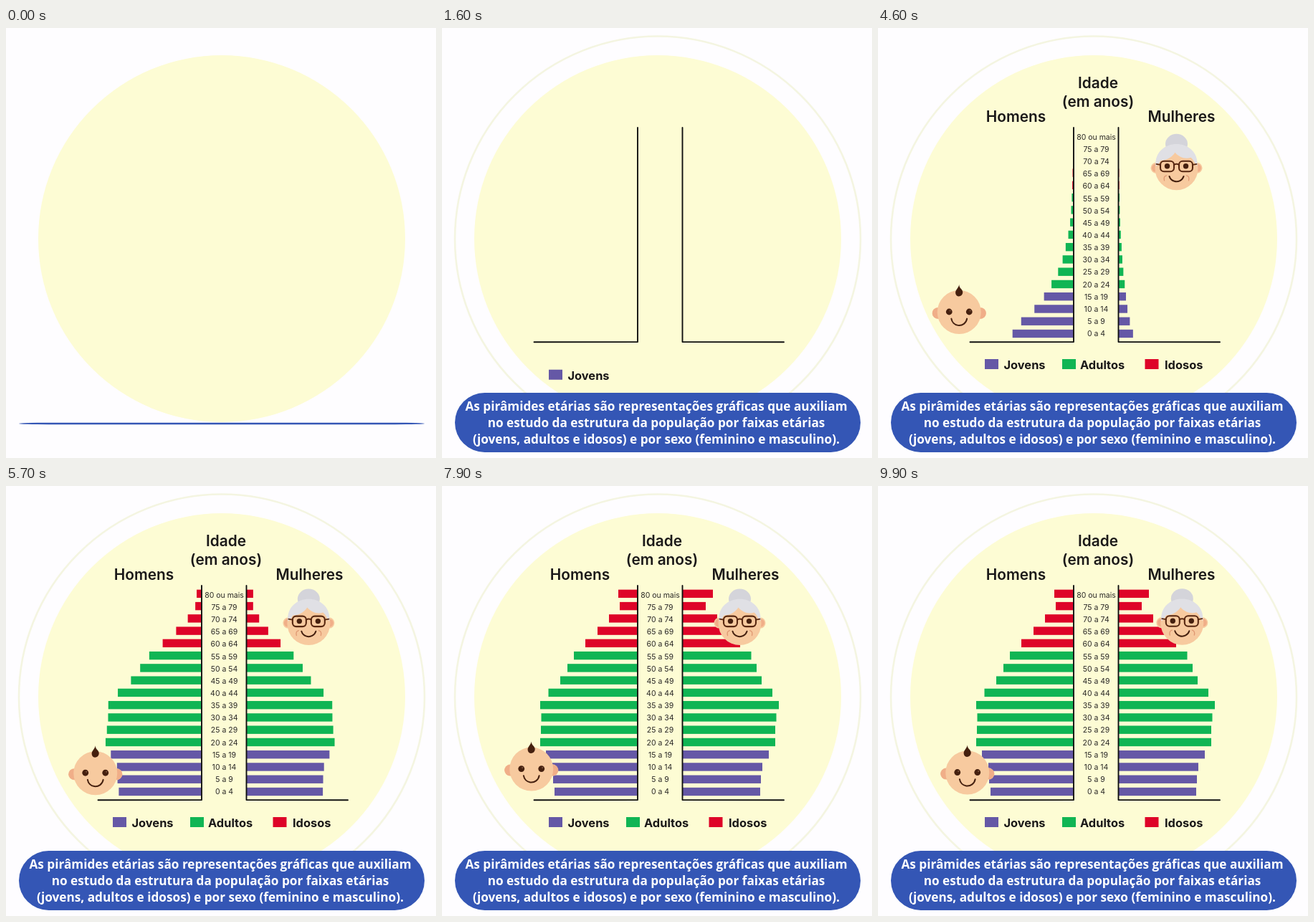
Animation of 600 by 600 pixels, one loop 10 s. Source, as an HTML page with a canvas:

```html
<!DOCTYPE html>
<html lang="pt">
<head>
<meta charset="utf-8">
<title>Pirâmide etária</title>
<style>
html, body { margin: 0; width: 100%; height: 100%; overflow: hidden; background: #fefdff; }
canvas { display: block; width: 600px; height: 600px; }
</style>
</head>
<body>
<canvas id="stage"></canvas>
<script>
const LOOP = 10000, TAU = Math.PI * 2;
const canvas = document.getElementById('stage');
const ctx = canvas.getContext('2d');
const dpr = window.devicePixelRatio || 1;
canvas.width = canvas.height = 600 * dpr;

const PURPLE = '#6558a6', GREEN = '#10b554', RED = '#de0428', INK = '#1a1818';
const BLUE = '#3456b5', BROWN = '#45200f', SKIN = '#f7ca9f', BLUSH = '#f0ae88';

// bar lengths from the youngest group up
const MEN = [115, 117, 118, 127, 135, 134, 133.5, 135, 123.5, 107, 97, 88, 72, 55, 39, 24, 26];
const WOMEN = [108, 109, 111, 120, 129, 129, 130.5, 134, 125, 110, 103, 95.5, 80, 64, 48, 32, 42];
const NOTE = [
  'As pirâmides etárias são representações gráficas que auxiliam',
  'no estudo da estrutura da população por faixas etárias',
  '(jovens, adultos e idosos) e por sexo (feminino e masculino).'
];
const LEGEND = [
  { name: 'Jovens', color: PURPLE, box: 149, x: 175.5, start: 1300 },
  { name: 'Adultos', color: GREEN, box: 257, x: 282, start: 1600 },
  { name: 'Idosos', color: RED, box: 372.5, x: 400, start: 1900 }
];

const part = (t, start, length) => Math.min(1, Math.max(0, (t - start) / length));
const outCubic = p => 1 - (1 - p) ** 3;
const inOutSine = p => (1 - Math.cos(Math.PI * p)) / 2;
const inOutExpo = p => p <= 0 ? 0 : p >= 1 ? 1
  : p < .5 ? 2 ** (20 * p - 11) : 1 - 2 ** (9 - 20 * p);
const outBack = p => 1 + 2.2 * (p - 1) ** 3 + 1.2 * (p - 1) ** 2;
const sway = (t, period, from, deg) => Math.sin(TAU * ((t - from) / period + deg / 360));

function disc(x, y, rx, color, ry = rx) {
  ctx.fillStyle = color;
  ctx.beginPath();
  ctx.ellipse(x, y, rx, ry, 0, 0, TAU);
  ctx.fill();
}

function stroke(color, width, trace) {
  ctx.strokeStyle = color;
  ctx.lineWidth = width;
  ctx.lineCap = ctx.lineJoin = 'round';
  ctx.beginPath();
  trace();
  ctx.stroke();
}

function text(str, x, y, font, color = INK, align = 'center') {
  ctx.font = font;
  ctx.fillStyle = color;
  ctx.textAlign = align;
  ctx.fillText(str, x, y);
}

function faded(alpha, draw) {
  if (alpha <= 0) return;
  ctx.save();
  ctx.globalAlpha = alpha;
  draw();
  ctx.restore();
}

function backdrop(t) {
  ctx.fillStyle = '#fefdff';
  ctx.fillRect(0, 0, 600, 600);
  disc(301, 294, 256, '#fdfcd4');
  const sweep = inOutSine(part(t, 200, 1250));
  if (sweep > 0) {
    stroke('#f4f5e1', 2.6, () => ctx.arc(301, 294.5, 283, -TAU / 4, -TAU / 4 + TAU * sweep));
  }
}

function axes(t) {
  const p = inOutSine(part(t, 700, 850));
  if (p <= 0) return;
  const up = Math.min(1, p * 1.5), out = Math.max(0, p * 3 - 2);
  for (const [x, end] of [[273, 128.5], [335.5, 477]]) {
    stroke('#111', 1.9, () => {
      ctx.moveTo(x, 139);
      ctx.lineTo(x, 139 + 299 * up);
      if (out > 0) ctx.lineTo(x + (end - x) * out, 438.2);
    });
  }
}

function legend(t) {
  for (const item of LEGEND) {
    if (t < item.start) continue;
    const drop = 50 * (1 - outCubic(part(t, item.start, 900)));
    ctx.fillStyle = item.color;
    ctx.fillRect(item.box, 462 + drop, 19, 14);
    text(item.name, item.x, 476 + drop, '700 16.4px Inter, sans-serif', INK, 'left');
  }
}

function headings(t) {
  const font = '600 20.8px Inter, sans-serif';
  const side = part(t, 1900, 800);
  faded(side, () => {
    const y = 130.5 - 20 * (1 - outCubic(side));
    text('Homens', 192.5, y, font);
    text('Mulheres', 423.5, y, font);
  });
  const top = part(t, 2350, 1200);
  faded(Math.min(1, top * 2.5), () => {
    const y = 83.5 - 31 * (1 - outCubic(top));
    text('Idade', 307, y, font);
    text('(em anos)', 307, y + 26, font);
  });
}

function ages(t) {
  for (let i = 0; i < 17; i++) {
    const label = i === 16 ? '80 ou mais' : `${i * 5} a ${i * 5 + 4}`;
    faded(part(t, 1700 + i * 55, 300), () =>
      text(label, 304.5, 430.2 - i * 17.15, '400 10.5px Inter, sans-serif', '#2a2826'));
  }
}

function bars(t) {
  const length = 3500;
  for (let i = 0; i < 17; i++) {
    const now = (t - 4600) / length;
    const y = 420.8 - i * 17.26;
    ctx.fillStyle = i < 4 ? PURPLE : i < 12 ? GREEN : RED;
    const men = MEN[i] * inOutExpo(now + .545 - i * .026);
    const women = WOMEN[i] * inOutExpo(now + .4275 - i * .019);
    if (men > .3) ctx.fillRect(272 - men, y, men, 11.4);
    if (women > .3) ctx.fillRect(336, y, women, 11.4);
  }
}

function note(t) {
  const open = Math.max(.03, outCubic(part(t, 50, 850)));
  const mid = 550.5 + 1.5 * (1 - open);
  ctx.save();
  ctx.translate(0, mid);
  ctx.scale(1, open);
  ctx.fillStyle = BLUE;
  ctx.beginPath();
  ctx.roundRect(18, -41.5, 566, 83, 41.5);
  ctx.fill();
  ctx.restore();
  faded(part(t, 550, 500), () => NOTE.forEach((line, i) =>
    text(line, 299, 533.5 + i * 23.2, '700 17.2px "Open Sans", "Noto Sans", sans-serif', '#fff')));
}

function baby() {
  for (const s of [-1, 1]) {
    disc(s * 29, 1.5, 8.3, SKIN);
    disc(s * 30, 1.5, 7.6, BLUSH);
  }
  disc(0, 0, 30.5, SKIN);
  ctx.fillStyle = BROWN;
  ctx.beginPath();
  ctx.moveTo(0, -38.5);
  ctx.bezierCurveTo(-1, -33, -6, -31, -5, -26);
  ctx.bezierCurveTo(-4, -20, 5, -21, 5, -28);
  ctx.bezierCurveTo(5, -32, 0, -33, 0, -38.5);
  ctx.fill();
  for (const s of [-1, 1]) {
    disc(s * 14, -.5, 4.4, BROWN);
    disc(s * 14 + 1.4, -2, 1.1, '#7d553f');
  }
  stroke(BROWN, 2, () => ctx.arc(0, 7.5, 11, .15, Math.PI - .15));
}

function elder() {
  const hair = '#e0e0e5';
  disc(0, -32, 15.5, '#d4d4da', 14);
  for (const s of [-1, 1]) {
    disc(s * 28.5, 1.5, 7.5, SKIN);
    disc(s * 29, 1.5, 5.5, BLUSH);
  }
  disc(0, 2, 30, SKIN, 30.5);
  ctx.fillStyle = hair;
  ctx.beginPath();
  ctx.moveTo(-29, -1);
  ctx.bezierCurveTo(-32, -42, 32, -42, 29, -1);
  ctx.bezierCurveTo(25, -5, 24, -10, 20, -13);
  ctx.bezierCurveTo(12, -10, 3, -14, -2, -20);
  ctx.bezierCurveTo(-7, -12, -16, -9, -22, -9);
  ctx.bezierCurveTo(-24, -6, -25, -3, -29, -1);
  ctx.fill();
  for (const s of [-1, 1]) {
    disc(s * 13, -1, 3.7, BROWN);
    stroke('#572710', 2.1, () => ctx.roundRect(s * 13 - 9.5, -8, 19, 14.5, 5));
    stroke('#572710', 1.8, () => {
      ctx.moveTo(s * 22.5, -3);
      ctx.lineTo(s * 28, -4);
    });
    stroke('#df9872', 1.3, () => {
      ctx.moveTo(s * 14, 12);
      ctx.quadraticCurveTo(s * 18.5, 13, s * 17, 19);
    });
  }
  stroke('#572710', 2, () => {
    ctx.moveTo(-3.5, -3);
    ctx.quadraticCurveTo(0, -5, 3.5, -3);
  });
  stroke(BROWN, 2, () => ctx.arc(0, 10, 10.5, .3, Math.PI - .3));
}

function head(draw, x, y, size) {
  if (size <= 0) return;
  ctx.save();
  ctx.translate(x, y);
  ctx.scale(size, size);
  draw();
  ctx.restore();
}

function heads(t) {
  head(baby, 119 - 6 * sway(t, 2200, 8900, 90), 398 + 3 * sway(t, 1500, 8800, 138),
    outBack(part(t, 3400, 600)));
  head(elder, 421.5 + 6 * sway(t, 3000, 8800, 20), 191.7 - 2.5 * sway(t, 2200, 9900, 90),
    outBack(part(t, 3600, 600)));
}

function draw(t) {
  ctx.setTransform(dpr, 0, 0, dpr, 0, 0);
  backdrop(t);
  legend(t);
  bars(t);
  axes(t);
  ages(t);
  headings(t);
  if (t > 3400) heads(t);
  note(t);
}

const begin = performance.now();
function tick() {
  draw((performance.now() - begin) % LOOP);
  requestAnimationFrame(tick);
}
tick();
</script>
</body>
</html>
```
